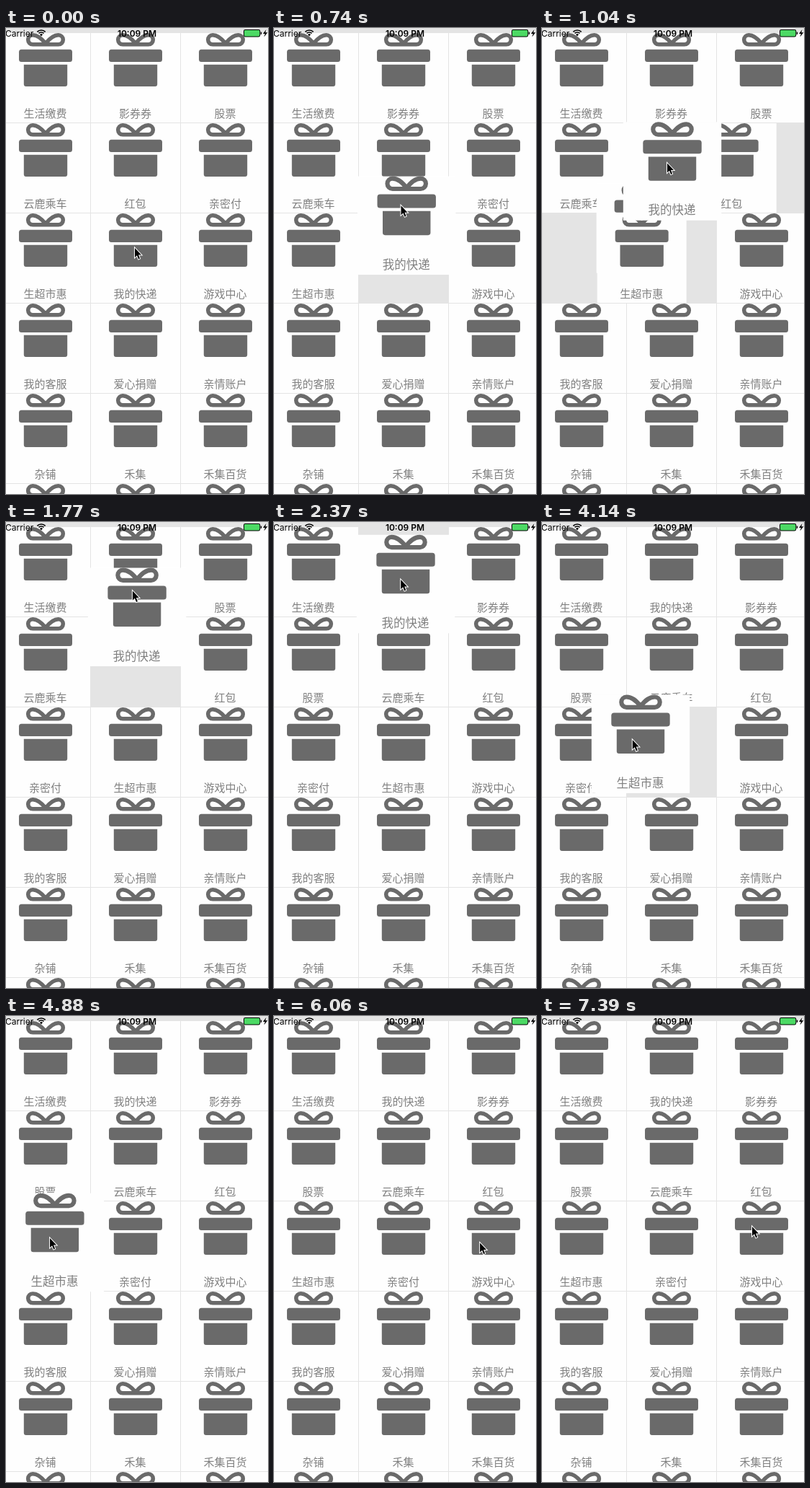
Write an HTML page with a canvas that moves like this. It is 364 px wide and 646 px high and loops after 8000 ms.

```html
<!DOCTYPE html>
<html lang="zh-CN">
<head>
<meta charset="utf-8">
<style>
  html, body { margin: 0; width: 364px; height: 646px; overflow: hidden; background: #e4e4e4; }
  canvas { display: block; }
</style>
</head>
<body>
<canvas id="stage" width="364" height="646"></canvas>
<script>
const ctx = document.getElementById('stage').getContext('2d');
const LOOP = 8000, TICK = 147.8;           // the picture refreshes once per tick
const PITCH = 125, SIZE = 124, LIFT = 1.1;
const GRAY = '#6a6a6a';
const CJK = '"Noto Sans CJK SC", "Noto Sans CJK JP", "Noto Sans CJK", sans-serif';

const labels = ['生活缴费', '影券券', '股票', '云鹿乘车', '红包', '亲密付', '生超市惠', '我的快递', '游戏中心',
  '我的客服', '爱心捐赠', '亲情账户', '杂铺', '禾集', '禾集百货', '', '', ''];

const clamp = p => Math.min(1, Math.max(0, p));
const smooth = p => p * p * (3 - 2 * p);
const flick = p => 1 - (1 - p) ** 4;
const progress = (n, start, end) => clamp((n - start) / (end - start));

// Times below are in ticks.
const home = [178, 303];
const strokes = [
  { start: 3, end: 7, to: [173, 185.5], ease: smooth },
  { start: 11, end: 13.6, to: [175.2, 78], ease: flick },
  { start: 19, end: 24, to: [180, 295], ease: smooth },
  { start: 27, end: 34, to: [60, 306], ease: flick },
  { start: 34, end: 38, to: [302, 293], ease: smooth },
  { start: 40, end: 44, to: [194, 418], ease: smooth },
  { start: 46, end: 50, to: [291, 290], ease: smooth },
];
const moves = [
  { start: 5.77, from: 7, to: 4 },
  { start: 12.2, from: 4, to: 1 },
  { start: 28.4, from: 7, to: 6 },
];
const holds = [
  { item: 7, start: 2, end: 17, lag: 0.5 },
  { item: 6, start: 27, end: 34, lag: 0.1 },
];

const bow = new Path2D('M0 14.5C-6 7-11 2.8-17.8 2.8A6.5 6.5 0 0 0-17.8 15.8H17.8A6.5 6.5 0 0 0 17.8 2.8C11 2.8 6 7 0 14.5Z');
const arrow = new Path2D('M1 2V15L4 12.3L6.2 17.5L8 16.6L6 11.5H10Z');
const bolt = new Path2D('M361.5 2L357 8H359.8L358.5 12.5L363.3 6.2H360.3Z');

const mix = (a, b, p) => a.map((v, k) => v + (b[k] - v) * p);
const slot = i => [-7 + i % 3 * PITCH, 7 + Math.floor(i / 3) * PITCH];

const pointerAt = n => strokes.reduce(
  (pos, { start, end, to, ease }) => mix(pos, to, ease(progress(n, start, end))), home);

function indexAfter(i, { from, to }) {
  if (i === from) return to;
  return i >= to && i < from ? i + 1 : i;
}

function tilePosition(i, n) {
  let pos = slot(i);
  for (const move of moves) {
    i = indexAfter(i, move);
    pos = mix(pos, slot(i), smooth(progress(n, move.start, move.start + 2)));
  }
  return pos;
}

function fillRound(x, y, w, h, r) {
  ctx.beginPath();
  ctx.roundRect(x, y, w, h, r);
  ctx.fill();
}

function drawTile(label, [x, y], scale = 1) {
  ctx.save();
  ctx.translate(x, y);
  ctx.scale(scale, scale);
  ctx.fillStyle = '#fefefe';
  ctx.fillRect(0, 0, SIZE, SIZE);
  ctx.translate(SIZE / 2, 0);
  ctx.strokeStyle = ctx.fillStyle = GRAY;
  ctx.lineWidth = 5.6;
  ctx.lineJoin = 'round';
  ctx.stroke(bow);
  fillRound(-37, 22.7, 74, 17.3, 3.5);
  fillRound(-30.2, 43.7, 60.4, 30.4, [0, 0, 3, 3]);
  ctx.fillStyle = '#808080';
  ctx.font = '15px ' + CJK;
  ctx.textAlign = 'center';
  ctx.fillText(label, -0.4, 116.5);
  ctx.restore();
}

function drawStatusBar() {
  ctx.fillStyle = ctx.strokeStyle = '#000';
  ctx.textAlign = 'left';
  ctx.font = '12px Inter, sans-serif';
  ctx.fillText('Carrier', -1, 11.5);
  ctx.textAlign = 'center';
  ctx.font = '600 12px Inter, sans-serif';
  ctx.fillText('10:09 PM', 182, 11.5);

  ctx.lineWidth = 1.7;
  for (const r of [8, 5]) {
    ctx.beginPath();
    ctx.arc(49, 11, r, -Math.PI * 0.75, -Math.PI * 0.25);
    ctx.stroke();
  }
  ctx.beginPath();
  ctx.moveTo(49, 11.5);
  ctx.arc(49, 11, 2.8, -Math.PI * 0.75, -Math.PI * 0.25);
  ctx.fill();

  fillRound(353.7, 5.5, 1.5, 3.5, [0, 1, 1, 0]);
  ctx.fill(bolt);
  fillRound(330, 2, 23.3, 10.4, 2.4);
  ctx.fillStyle = '#4cd964';
  fillRound(331, 3, 21.3, 8.4, 1.4);
}

function drawPointer([x, y]) {
  ctx.save();
  ctx.translate(x, y);
  ctx.strokeStyle = '#fff';
  ctx.lineWidth = 2;
  ctx.lineJoin = 'miter';
  ctx.stroke(arrow);
  ctx.fillStyle = '#000';
  ctx.fill(arrow);
  ctx.restore();
}

function draw(now) {
  const n = Math.floor(now % LOOP / TICK + 0.05);
  const hold = holds.find(h => n >= h.start && n < h.end);

  ctx.fillStyle = '#e4e4e4';
  ctx.fillRect(0, 0, 364, 646);
  labels.forEach((label, i) => {
    if (!hold || hold.item !== i) drawTile(label, tilePosition(i, n));
  });
  if (hold) {
    const [x, y] = pointerAt(n - hold.lag), half = SIZE * LIFT / 2;
    drawTile(labels[hold.item], [x + 7.8 - half, y + 8 - half], LIFT);
  }
  drawStatusBar();
  drawPointer(pointerAt(n));
  requestAnimationFrame(draw);
}
requestAnimationFrame(draw);
</script>
</body>
</html>
```
